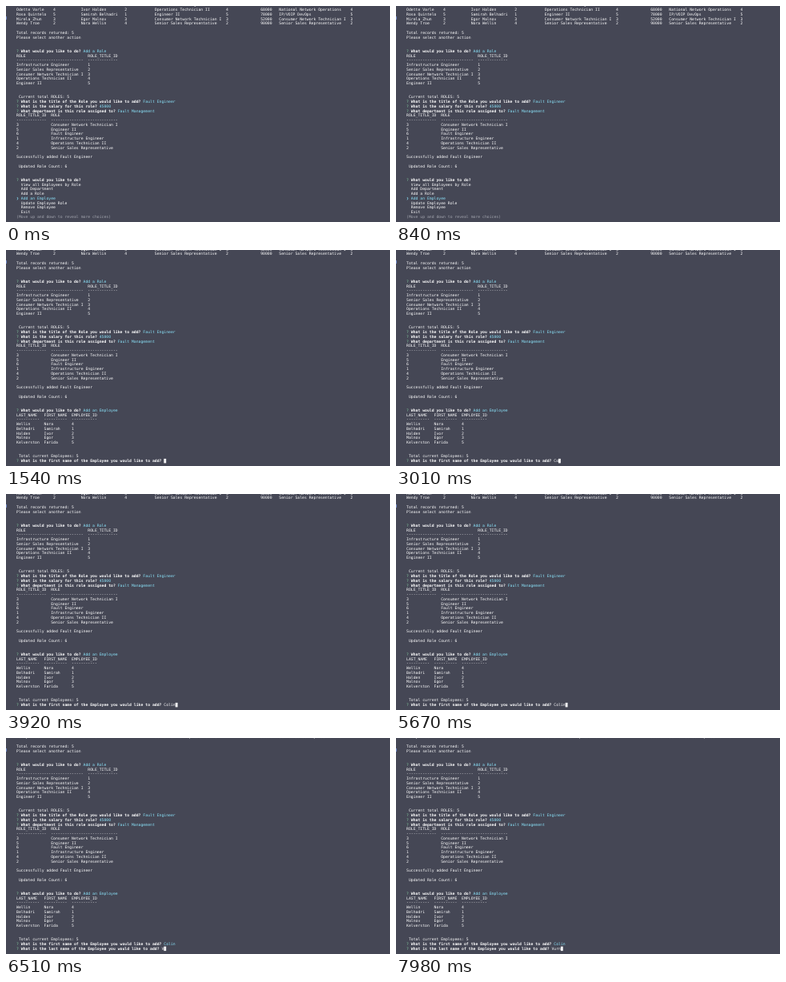
An HTML page for the animation above (8 s loop, 480 by 270 pixels).

```html
<!DOCTYPE html>
<html lang="en">
<head>
<meta charset="utf-8">
<title>Employee tracker</title>
<style>
  html, body { margin: 0; width: 100%; height: 100%; overflow: hidden; background: #454755; }
  #stage { position: relative; width: 480px; height: 270px; overflow: hidden; background: #454755; }
  /* Laid out ten times larger, so that the glyph advances stay fractional. */
  #term {
    position: absolute; left: 12.8px; top: -3.7px; margin: 0;
    transform-origin: 0 0; transform: scale(.1);
    font: 47.84px/57.5px "DejaVu Sans Mono", "Liberation Mono", monospace;
    text-rendering: geometricPrecision; font-variant-ligatures: none;
    color: #fff; white-space: pre;
  }
  #edge { position: absolute; left: 0; top: 13px; width: 1px; height: 4px; background: #6c86c4; }
  b { font-weight: 700; }
  .mark { color: #86cfa0; }
  .cyan { color: #8be4fb; }
  .dim { color: #a3a5ae; }
  .cursor { background: #f4f4f6; }
</style>
</head>
<body>
<div id="stage"><pre id="term"></pre><div id="edge"></div></div>
<script>
const LOOP = 8000, LINE = 5.75, TOP = -3.7;
const term = document.getElementById('term');

const cyan = s => `<span class="cyan">${s}</span>`;
const ask = (q, answer = '') => `<span class="mark">?</span> <b>${q}</b> ${answer}`;
const cursor = '<span class="cursor"> </span>';

// Places each cell at its column.
const row = (cols, cells) =>
  cells.reduce((s, c, i) => s.padEnd(cols[i]) + c, '');

// Header, rule and rows of a table with the given column widths.
function table(widths, head, rows) {
  let x = 0;
  const cols = widths.map(w => (x += w + 2) - w - 2);
  return [head, widths.map(w => '-'.repeat(w)), ...rows].map(r => row(cols, r));
}

const infra = 'Infrastructure Engineer', sales = 'Senior Sales Representative',
      tech = 'Consumer Network Technician I', ops = 'Operations Technician II',
      eng = 'Engineer II';
const wide = [0, 16, 28, 47, 60, 91, 106, 114, 145];
const action = 'What would you like to do?';

const history = [
  ...[
    ['Henrik Ostvall', 1, 'Farida Kelverston', 5, infra, 1, 65000, 'Infrastructure', 1],
    ['Odette Varle', 4, 'Ivor Halden', 2, ops, 4, 68000, 'National Network Operations', 4],
    ['Rosa Quintelo', 5, 'Samirah Belhadri', 1, eng, 5, 78000, 'IP/VOIP DevOps', 5],
    ['Mirela Zhun', 3, 'Egor Malnov', 3, tech, 3, 52000, tech, 3],
    ['Wendy Troe', 2, 'Nora Wellin', 4, sales, 2, 90000, sales, 2]
  ].map(r => row(wide, r)),
  '',
  'Total records returned: 5',
  'Please select another action',
  '', '',
  ask(action, cyan('Add a Role')),
  ...table([29, 13], ['ROLE', 'ROLE_TITLE_ID'],
    [[infra, 1], [sales, 2], [tech, 3], [ops, 4], [eng, 5]]),
  '', '',
  ' Current total ROLES: 5',
  ask('What is the title of the Role you would like to add?', cyan('Fault Engineer')),
  ask('What is the salary for this role?', cyan('45000')),
  ask('What department is this role assigned to?', cyan('Fault Management')),
  ...table([13, 29], ['ROLE_TITLE_ID', 'ROLE'],
    [[3, tech], [5, eng], [6, 'Fault Engineer'], [1, infra], [4, ops], [2, sales]]),
  '',
  'Successfully added Fault Engineer',
  '',
  ' Updated Role Count: 6',
  '', ''
];

const menu = [
  ask(action),
  '  View all Employees by Role',
  '  Add Department',
  '  Add a Role',
  cyan('❯ Add an Employee'),
  '  Update Employee Role',
  '  Remove Employee',
  '  Exit',
  '<span class="dim">(Move up and down to reveal more choices)</span>'
];

const chosen = ask(action, cyan('Add an Employee'));

const staff = [
  chosen,
  ...table([10, 10, 11], ['LAST_NAME', 'FIRST_NAME', 'EMPLOYEE_ID'], [
    ['Wellin', 'Nora', 4], ['Belhadri', 'Samirah', 1], ['Halden', 'Ivor', 2],
    ['Malnov', 'Egor', 3], ['Kelverston', 'Farida', 5]
  ]),
  '', '',
  ' Total current Employees: 5'
];

const first = { q: 'What is the first name of the Employee you would like to add?',
                text: 'Colin', keys: [2660, 3010, 3360, 3710, 3920] };
const last = { q: 'What is the last name of the Employee you would like to add?',
               text: 'Vurn', keys: [6510, 6790, 7070, 7700] };

const typing = (f, t) =>
  ask(f.q, f.text.slice(0, f.keys.filter(k => t >= k).length) + cursor);

function screen(t) {
  if (t < 1330) return { tail: menu, scroll: 0 };
  if (t < 1540) return { tail: [chosen, cursor], scroll: 0 };
  if (t < 5740) return { tail: [...staff, typing(first, t)], scroll: 3 };
  return { tail: [...staff, ask(first.q, cyan(first.text)), typing(last, t)], scroll: 4 };
}

let shown = '';
function draw() {
  const { tail, scroll } = screen(performance.now() % LOOP);
  const html = [...history, ...tail].join('\n');
  if (html !== shown) {
    term.innerHTML = shown = html;
    term.style.top = TOP - scroll * LINE + 'px';
  }
  requestAnimationFrame(draw);
}
draw();
</script>
</body>
</html>
```
